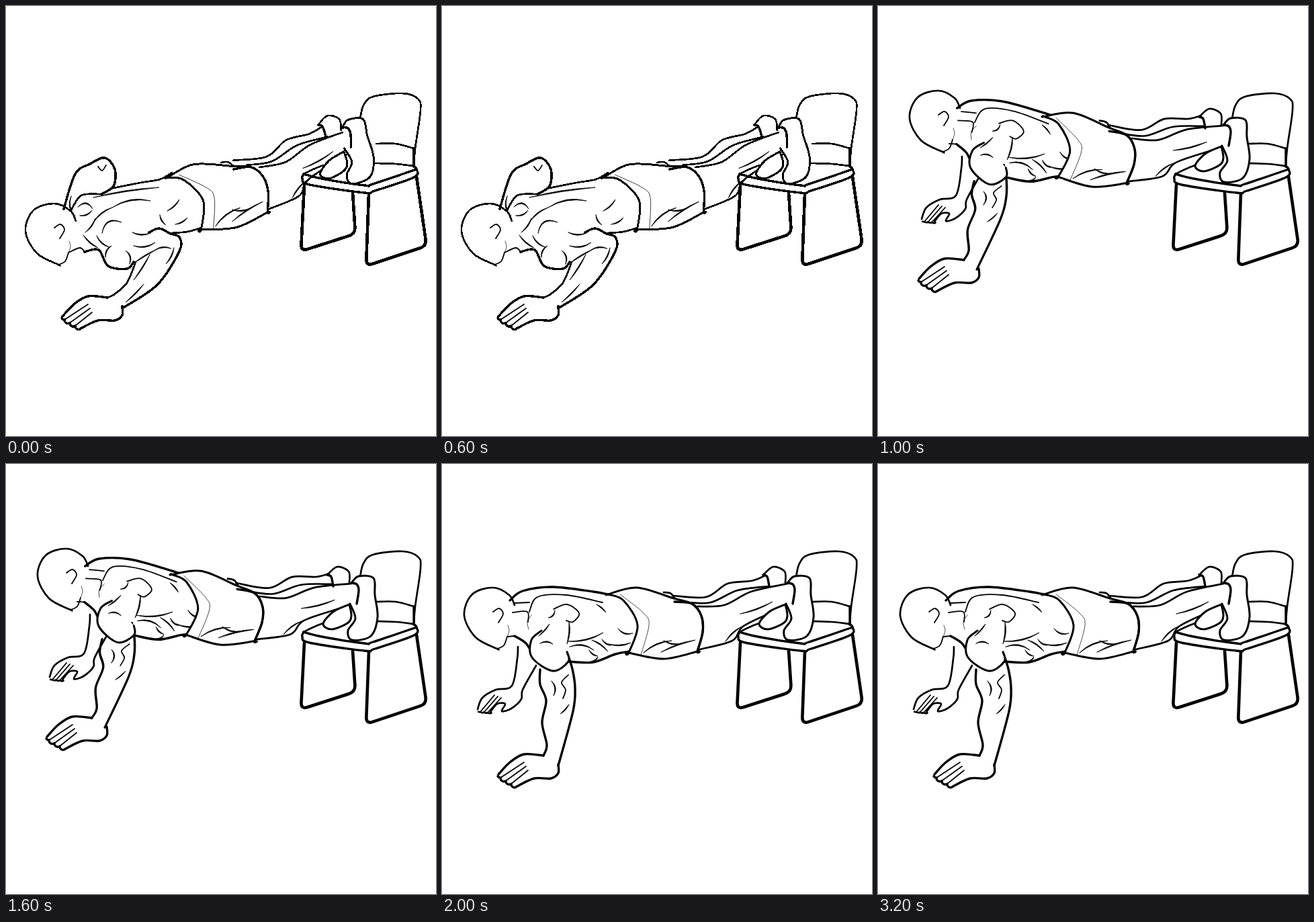
An HTML page for the animation above (4 s loop, 640 by 640 pixels).

```html
<!DOCTYPE html>
<html lang="en">
<head>
<meta charset="utf-8">
<title>Raised push-up</title>
<style>
html, body { margin: 0; width: 100%; height: 100%; overflow: hidden; background: #fff; }
svg { display: block; width: 100%; height: 100%; }
path { fill: none; stroke: #000; stroke-linecap: round; stroke-linejoin: round; }
.leg { stroke-width: 4.6; }
.bold { stroke-width: 3.4; }
.line { stroke-width: 2.7; }
.solid { stroke-width: 3; fill: #fff; }
.fine { stroke-width: 1.8; }
.hair { stroke-width: .7; }
.mark { stroke-width: .8; fill: #000; }
.fine, .hair, .mark { shape-rendering: geometricPrecision; }
</style>
</head>
<body>
<svg id="stage" viewBox="0 0 640 640"></svg>
<script>
const NS = 'http://www.w3.org/2000/svg';
const stage = document.getElementById('stage');

function add(parent, tag, attrs) {
  const el = document.createElementNS(NS, tag);
  for (const k in attrs) el.setAttribute(k, attrs[k]);
  return parent.appendChild(el);
}

const points = s => s.split(' ').map(p => p.split(',').map(Number));

// Smooth curve through key points; a doubled point makes a corner.
function smooth(pts) {
  const at = i => pts[Math.max(0, Math.min(pts.length - 1, i))];
  let d = 'M' + pts[0];
  for (let i = 0; i < pts.length - 1; i++) {
    const a = at(i - 1), b = at(i), c = at(i + 1), e = at(i + 2);
    const p = b.map((v, k) => v + (c[k] - a[k]) / 6);
    const q = c.map((v, k) => v - (e[k] - b[k]) / 6);
    d += `C${p} ${q} ${c}`;
  }
  return d;
}

// Straight sides with rounded corners.
function rounded(pts, r = 10) {
  const toward = (a, b) => {
    const k = r / Math.hypot(b[0] - a[0], b[1] - a[1]);
    return a.map((v, i) => v + (b[i] - v) * k);
  };
  const bends = pts.slice(1, -1).map((p, i) => `L${toward(p, pts[i])}Q${p} ${toward(p, pts[i + 2])}`);
  return `M${pts[0]}${bends.join('')}L${pts[pts.length - 1]}`;
}

// Muscle mark: a bent sliver, thick in the middle.
function sliver([a, b, [bend]]) {
  const dx = b[0] - a[0], dy = b[1] - a[1], len = Math.hypot(dx, dy);
  const ctrl = h => [(a[0] + b[0]) / 2 - dy / len * h * 2, (a[1] + b[1]) / 2 + dx / len * h * 2];
  return `M${a}Q${ctrl(bend - .8)} ${b}Q${ctrl(bend + .8)} ${a}Z`;
}

const shapes = { mark: sliver, leg: rounded };
const defs = add(stage, 'defs', {});

function part(id, art) {
  const g = add(defs, 'g', { id });
  for (const cls in art) {
    for (const s of art[cls]) add(g, 'path', { class: cls, d: (shapes[cls] || smooth)(points(s)) });
  }
  return g;
}

// Four fingertips in a row, with creases running back to the knuckles.
function fingers(g, cls, knuckle, kStep, tip, tStep) {
  const along = (p, step, i) => p.map((v, k) => v + step[k] * i);
  let tips = 'M' + along(tip, tStep, -.5);
  for (let i = 0; i < 4; i++) {
    const end = along(tip, tStep, i);
    tips += `A5 5 0 0 0 ${end}`;
    if (i < 3) add(g, 'path', { class: 'fine', d: `M${along(knuckle, kStep, i)}L${end}` });
  }
  add(g, 'path', { class: cls, d: tips });
}

part('chair', {
  leg: ['444,266 439,365 520,339 516,278', '540,279 536,387 626,357 611,254'],
  line: [
    '527,168 532,148 546,135 590,130 613,138 617,155 609,212 607,239',
    '551,205 580,205 607,212', '549,234 580,235 606,238', '443,250 455,244 472,237'
  ],
  bold: [
    '607,212 607,239', '443,250 470,257 534,267 546,265 611,243',
    '443,250 441,257 452,266 534,278 549,275 607,255 611,243 606,238'
  ]
});

part('farFoot', {
  solid: ['511,209 487,220 472,238 485,246 508,237 514,226 511,209'],
  line: ['478,165 493,153 510,160 511,177'],
  bold: ['478,165 484,168 487,182']
});

part('nearFoot', {
  solid: ['515,176 525,167 547,170 549,195 553,228 543,256 515,262 509,248 520,230 512,208'],
  bold: ['514,177 522,179 525,188 522,208']
});

part('legs', {
  line: [
    '343,196 393,198 425,178 460,174 479,167', '362,206 400,206 440,188 487,182',
    '380,212 420,210 460,190 515,178', '383,276 432,263 449,241 500,217 522,208'
  ],
  mark: ['422,264 446,242 -2', '444,223 492,205 2']
});

part('shorts', {
  line: ['330,191 341,193 351,207'],
  solid: ['247,194 247,194 290,184 345,200 372,208 386,226 388,250 380,279 380,279 330,290 278,281 278,281 291,240 270,203 247,194 247,194'],
  bold: ['346,205 372,208 386,226 388,250 380,279'],
  mark: ['300,281 342,263 -4', '326,280 377,262 -2', '330,263 357,267 3'],
  hair: ['265,194 300,222 308,240 296,284']
});

part('head', {
  line: ['108,210 100,195 76,184 45,194 33,225 50,258 82,275 82,275'],
  fine: ['82,275 92,270 97,257', '76,220 85,215 91,223 84,236'],
  hair: ['97,257 100,248 98,240']
});

fingers(part('nearHand', {
  bold: ['151,434 122,432 101,444 84,462', '111,480 137,468 162,468 173,460 173,447']
}), 'bold', [122, 444], [3, 6], [87, 467], [8, 4.5]);

fingers(part('farArm', {
  line: [
    '113,272 112,290 104,330 80,336 60,348 53,365',
    '140,300 120,336 118,350 103,364 89,368 94,357 82,357 72,369'
  ]
}), 'line', [78, 344], [5, 2], [57, 369], [5.5, .5]);

part('arm', {
  bold: [
    '146,306 146,328 155,352 149,385 156,418 151,434',
    '186,280 194,305 198,333 195,368 173,449'
  ],
  fine: ['180,349 184,336 178,325 188,314'],
  mark: ['163,323 166,345 -4', '189,358 176,372 -1']
});

part('torso', {
  bold: [
    '101,203 120,189 165,183 225,190 247,194',
    '188,294 225,295 258,283 279,279', '108,256 124,266 133,279'
  ],
  solid: ['148,248 133,262 134,288 165,308 188,294 186,280'],
  fine: [
    '130,220 142,198 185,195 239,206', '105,221 127,220 128,235', '108,207 130,206',
    '166,216 186,209 204,222 195,235 185,233', '97,257 108,256'
  ],
  mark: [
    '168,218 158,229 -3', '144,256 160,238 1', '189,234 186,268 -2', '146,267 165,268 -3',
    '188,264 240,251 4', '230,209 244,221 -1', '262,245 284,252 4', '248,268 281,266 3',
    '190,272 226,277 -5', '223,262 247,279 -2', '238,261 252,270 2', '219,277 232,286 2',
    '222,294 232,287 2'
  ],
  hair: ['133,225 127,235 129,246']
});

part('lowTorso', {
  bold: [
    '213,337 228,331 245,339 258,344 258,365 225,415 173,450',
    '117,366 138,363 152,387 180,391 190,381',
    '86,302 103,250 125,235 147,226 162,243 160,268 142,280'
  ],
  line: [
    '142,280 112,282 97,304', '193,381 180,412 160,430 150,434',
    '155,272 200,263 229,258 247,248', '246,338 270,336 291,330'
  ],
  fine: ['137,239 143,245 149,237', '93,367 110,360 118,367'],
  mark: [
    '130,285 228,270 -2', '158,300 215,290 -6', '130,322 158,300 -3', '118,337 133,316 2',
    '115,341 137,360 2', '135,342 154,359 3', '143,338 172,322 -10', '148,374 157,357 -3',
    '184,384 178,364 4', '188,337 215,338 3', '190,357 222,352 4', '240,305 258,288 2',
    '229,311 238,326 2', '252,325 270,315 2', '225,362 190,383 1', '222,363 246,361 -3',
    '250,360 238,384 -2', '214,370 190,408 -1', '205,414 178,441 -1', '97,283 103,313 5',
    '107,299 129,302 -7', '110,312 128,304 3'
  ]
});

// Each pose places the parts in drawing order, turning them about their joints.
const LOOP = 4000;
const poses = [
  { from: 0, to: 1000, edges: 'crispEdges', rig: {
    chair: '', head: 'translate(-4 110)', lowTorso: '', nearHand: '',
    legs: 'rotate(-8.5 567 245)', shorts: 'rotate(-13.5 503 254)',
    farFoot: 'rotate(-7 570 280)', nearFoot: 'rotate(-9.5 531 262)'
  } },
  { from: 1000, to: 2000, edges: 'auto', rig: {
    chair: '', head: 'translate(14 -58)', farArm: 'translate(12 -48)',
    arm: 'matrix(1 0 -.16 .92 46 -21)', nearHand: 'translate(-23 -56)',
    torso: 'rotate(8.5 452 290)', legs: 'rotate(6.3 515 180)', shorts: 'rotate(6.3 515 180)',
    farFoot: '', nearFoot: ''
  } },
  { from: 2000, to: LOOP, edges: 'auto', rig: {
    chair: '', head: '', farArm: '', arm: '', nearHand: '',
    torso: '', legs: '', shorts: '', farFoot: '', nearFoot: ''
  } }
];

const groups = poses.map(({ edges, rig }) => {
  const g = add(stage, 'g', { 'shape-rendering': edges });
  for (const id in rig) add(g, 'use', { href: '#' + id, transform: rig[id] });
  return g;
});

function tick() {
  const t = performance.now() % LOOP;
  poses.forEach(({ from, to }, i) => {
    groups[i].style.display = t >= from && t < to ? '' : 'none';
  });
  requestAnimationFrame(tick);
}
tick();
</script>
</body>
</html>
```
